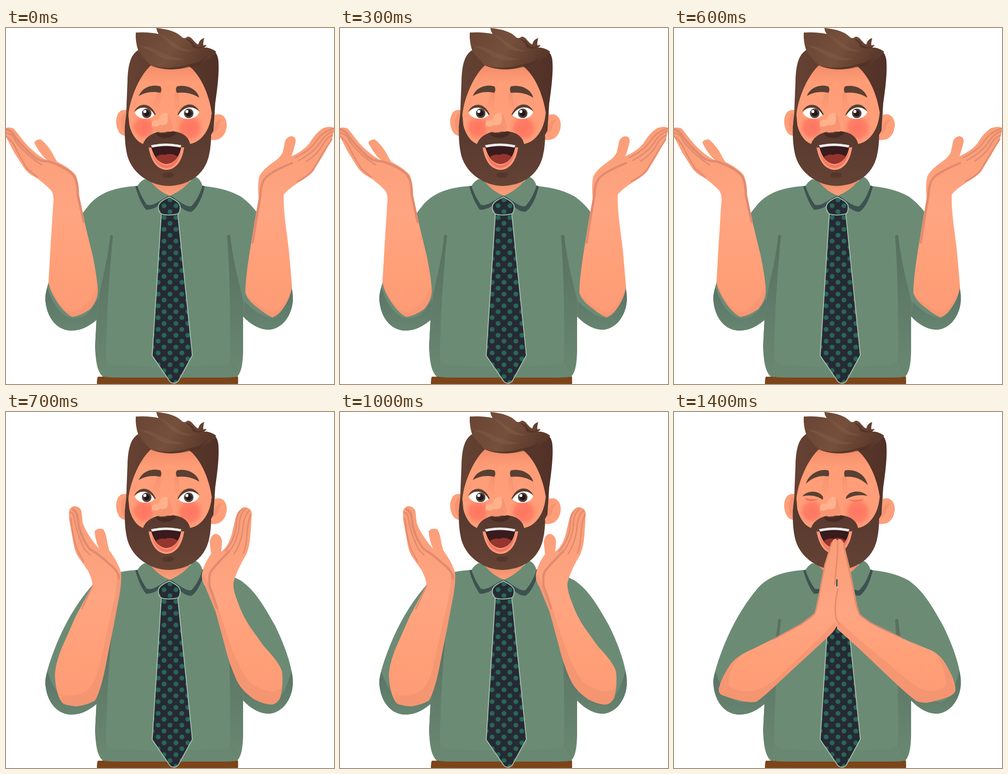
Write an HTML page that moves like this. It is 718 px wide and 780 px high and loops after 1500 ms.

```html
<!DOCTYPE html>
<html lang="en">
<head>
<meta charset="utf-8">
<title>Clapping man</title>
<style>
  html, body { margin: 0; width: 100%; height: 100%; overflow: hidden; background: #fff; }
  svg { display: block; width: 718px; height: 780px; }
  .skin { fill: url(#skin); }
  .shade { fill: #ed8f6f; }
  .line { fill: none; stroke: #e18b6f; stroke-width: 5; stroke-linecap: round; stroke-linejoin: round; }
  .thin { stroke-width: 3; }
  .brow { fill: #5a4033; }
  .dark { fill: #3d5250; }
  .cloth { fill: #6c8b75; }
  .tie { fill: url(#dots); stroke: #a5c0ae; stroke-width: 2; stroke-linejoin: round; }
</style>
</head>
<body>
<svg viewBox="0 0 718 780">
  <defs>
    <linearGradient id="skin" x1="0" y1="0" x2="0" y2="1">
      <stop offset="0" stop-color="#fa9d78"/><stop offset=".45" stop-color="#ffa581"/><stop offset=".75" stop-color="#ff9f78"/><stop offset="1" stop-color="#fc9b75"/>
    </linearGradient>
    <linearGradient id="face" x1="0" y1="0" x2="0" y2="1">
      <stop offset="0" stop-color="#f18c68"/><stop offset=".2" stop-color="#ff9d77"/><stop offset="1" stop-color="#ff9f7a"/>
    </linearGradient>
    <linearGradient id="neck" x1="0" y1="0" x2="0" y2="1">
      <stop offset="0" stop-color="#e38461"/><stop offset="1" stop-color="#ffa27d"/>
    </linearGradient>
    <linearGradient id="hair" x1="0" y1="0" x2="1" y2="0">
      <stop offset="0" stop-color="#654233"/><stop offset=".6" stop-color="#5b392c"/><stop offset="1" stop-color="#513127"/>
    </linearGradient>
    <linearGradient id="quiff" x1="0" y1="0" x2="1" y2=".3">
      <stop offset="0" stop-color="#684434"/><stop offset=".55" stop-color="#76503c"/><stop offset="1" stop-color="#5b392b"/>
    </linearGradient>
    <linearGradient id="beard" x1="0" y1="0" x2="0" y2="1">
      <stop offset="0" stop-color="#53352c"/><stop offset=".6" stop-color="#5e3e32"/><stop offset="1" stop-color="#644234"/>
    </linearGradient>
    <linearGradient id="fold" x1="0" y1="0" x2="0" y2="1">
      <stop offset="0" stop-color="#58705f"/><stop offset=".6" stop-color="#627e6b"/><stop offset="1" stop-color="#6a8872"/>
    </linearGradient>
    <linearGradient id="cuff" x1="0" y1="0" x2="0" y2="1">
      <stop offset="0" stop-color="#587264"/><stop offset="1" stop-color="#678570"/>
    </linearGradient>
    <linearGradient id="bridge" x1="0" y1="0" x2="0" y2="1">
      <stop offset="0" stop-color="#ee8a69" stop-opacity=".6"/><stop offset="1" stop-color="#ee8a69" stop-opacity="0"/>
    </linearGradient>
    <radialGradient id="blush">
      <stop offset="0" stop-color="#ff7460"/><stop offset=".55" stop-color="#ff7a63" stop-opacity=".85"/><stop offset="1" stop-color="#ff9d77" stop-opacity="0"/>
    </radialGradient>
    <pattern id="dots" x="346" y="492.6" width="26" height="25.8" patternUnits="userSpaceOnUse">
      <rect width="26" height="26" fill="#252a35"/>
      <g fill="#2a6657">
        <circle cx="13" cy="12.9" r="5.3"/>
        <circle r="5.3"/><circle cx="26" r="5.3"/><circle cy="25.8" r="5.3"/><circle cx="26" cy="25.8" r="5.3"/>
      </g>
    </pattern>
    <clipPath id="faceClip"><path d="M317 82Q355 98 399 82C428 104 446 150 451 190L446 240 403 255Q355 215 300 255L272 235 268 190C272 150 294 103 317 82Z"/></clipPath>
  </defs>

  <g id="body">
    <path fill="#7c4419" d="M201 764H508V780H199Q199 768 201 764Z"/>
    <path class="cloth" d="M286 346C245 349 205 358 180 390C145 432 116 488 97 545C90 567 86 580 86 593C88 637 114 663 143 663C165 663 182 653 198 640L195 696C196 728 199 752 212 764Q230 766 260 766H460Q490 766 506 764C518 752 519 725 519 696V632C536 650 556 661 575 661C605 660 628 628 628 592C627 560 612 515 589 468C562 420 545 392 515 370C490 355 460 349 430 346Z"/>
    <path fill="url(#cuff)" d="M91 569C100 600 120 632 145 636C170 637 185 625 202 592L198 640C182 653 165 663 143 663C114 663 88 637 86 593Q86 582 91 569ZM625 567C617 595 605 632 583 636Q550 630 523 600L519 632C536 650 556 661 575 661C605 660 628 628 628 592Q628 580 625 567Z"/>
    <path fill="url(#fold)" d="M228 455Q231 452 234 455C227 530 219 640 219 732L211 763Q199 750 195 700L198 640 204 585C213 540 224 500 228 455ZM484 455Q487 452 491 455C495 500 510 560 521 604L519 632V696Q519 745 506 764L491 732C491 620 490 540 484 455Z"/>
    <path fill="#64806c" d="M219 724Q222 738 245 739Q350 744 465 739Q488 737 491 724L510 755Q505 766 490 766H230L212 764Z" opacity=".35"/>
    <path fill="url(#neck)" d="M314 325H406L398 348 359 369 320 348Z"/>
    <path class="dark" d="M283 347L290 345 318 382 358 367 400 385 428 344 435 347C429 375 417 397 405 403Q393 402 383 393L359 374 326 394Q314 399 306 398C296 385 288 365 283 347Z"/>
    <path class="cloth" d="M303 331Q290 339 288 347C294 365 302 378 308 387Q316 390 328 384L357 367Q331 356 316 335ZM413 325Q426 330 430 346C423 368 414 382 405 391Q395 391 382 382L360 367Q385 356 401 338Z"/>
    <path class="tie" d="M340 407L320 718 359 775Q368 782 377 774L408 717 376 407Z"/>
    <path class="tie" d="M334 388C338 379 347 376 358 370C368 377 378 380 381 389Q382 402 377 407Q358 412 341 408Q331 401 334 388Z"/>
  </g>

  <g id="head">
    <path fill="#ff9f7a" d="M266 181C250 175 241 188 241 207C243 227 252 238 264 236ZM455 191C475 183 485 199 483 217C480 236 469 248 448 245Z"/>
    <path fill="#f08f70" d="M262 184Q249 194 252 214Q254 226 262 233ZM454 225C455 207 464 198 475 201Q465 208 465 219Q461 229 453 232Z" opacity=".65"/>
    <path fill="url(#hair)" d="M290 48C273 58 267 80 266 115L263 190 260 220 300 250H440L454 225 458 165C463 130 467 97 465 72Q463 48 440 43Z"/>
    <path fill="url(#face)" d="M317 82Q355 98 399 82C428 104 446 150 451 190L446 250 403 265H300L272 235 268 190C272 150 294 103 317 82Z"/>
    <g clip-path="url(#faceClip)">
      <path fill="url(#bridge)" d="M341 133Q338 155 337 185H318Q325 160 331 138ZM370 140Q366 160 370 185H385Q378 160 378 140Z"/>
      <circle cx="302" cy="218" r="32" fill="url(#blush)"/>
      <circle cx="402" cy="219" r="35" fill="url(#blush)"/>
    </g>
    <path fill="url(#beard)" d="M264 188C258 215 259 255 266 281C277 319 316 346 357 346C402 344 434 321 444 281Q449 260 449 235L457 185 450 188C447 224 427 250 403 254Q398 232 371 227H335Q307 234 300 254C281 247 268 221 266 188Z"/>
    <path fill="#f79572" d="M326 204Q317 207 318 217Q323 226 338 229Q355 230 366 219L357 190Z"/>
    <path fill="#ffb08c" d="M337 193Q345 183 353 187Q357 201 352 210Q344 215 337 212Q329 219 320 214Q316 205 326 201Q336 203 337 193Z"/>
    <path fill="#492b23" d="M328 229Q347 236 365 226Q374 227 371 233Q350 248 330 235Z"/>
    <path fill="url(#quiff)" d="M284 10Q310 8 334 13Q330 7 329 0C350 2 374 7 386 21Q393 24 397 19Q404 18 411 28Q418 36 421 36Q423 25 434 22Q431 33 432 38L439 37Q436 43 432 43Q450 43 460 52Q442 78 399 83Q358 99 317 82Q301 65 290 51Q283 32 284 10Z"/>
    <path fill="#86604a" d="M292 40C325 36 350 68 394 67Q360 76 334 62Q313 46 292 40ZM334 13C360 21 376 48 410 50Q380 55 362 39Q348 23 334 13Z" opacity=".4"/>
    <path fill="#4d3026" d="M317 82Q358 93 398 80Q425 76 436 65Q427 84 399 86Q358 97 317 82ZM394 25Q406 23 413 38Q425 45 436 40Q425 49 408 42Q407 32 394 25Z" opacity=".7"/>

    <g id="awake">
      <path class="brow" d="M291 149C297 131 319 122 338 128Q342 134 338 142C320 138 304 141 291 149ZM374 128Q370 135 374 142C394 140 410 144 423 153C419 134 395 123 374 128Z"/>
      <path fill="#fff" d="M282 186C292 169 315 169 326 189C317 203 290 202 282 186ZM377 190C386 169 412 168 423 184C417 202 387 204 377 190Z"/>
      <g fill="#55423d"><circle cx="308" cy="187" r="10.5"/><circle cx="400" cy="187" r="10.5"/></g>
      <g fill="#231819"><circle cx="308" cy="187" r="6.8"/><circle cx="400" cy="187" r="6.8"/></g>
      <g fill="#fff"><circle cx="304" cy="183" r="3.3"/><circle cx="396" cy="183" r="3.3"/></g>
      <path class="brow" d="M280 184C291 161 317 163 328 190L325 190C314 171 294 170 280 184ZM375 191C386 162 413 160 424 184C410 169 390 171 378 190Z"/>
    </g>
    <g id="laugh">
      <path class="brow" d="M289 157C294 137 318 123 338 128Q341 134 338 141C319 138 302 144 289 157ZM374 128Q371 135 374 142C394 140 410 146 424 160C419 137 397 124 374 128Z"/>
      <path class="brow" d="M281 185C292 170 319 172 326 186Q327 191 325 192C313 183 295 181 281 185ZM376 190C378 174 407 167 424 184C408 180 391 183 378 190Z"/>
      <path fill="#f5745d" d="M286 188Q300 192 317 190Q309 196 296 195Q288 194 286 188ZM384 192Q400 194 416 190Q412 196 398 197Q387 197 384 192Z"/>
    </g>

    <path fill="#ff9a7b" d="M312 261Q318 265 320 256H382Q383 264 390 261C386 289 374 310 351 311C328 309 317 289 312 261Z"/>
    <path fill="#f27660" d="M318 270Q330 298 351 301Q373 296 384 269Q376 305 351 307Q326 305 318 270Z"/>
    <path fill="#391b1d" d="M317 257Q350 248 384 257C382 277 371 297 350 298C331 295 322 278 317 257Z"/>
    <path fill="#f0eded" d="M317 257Q350 249 384 257L382 262Q350 255 320 262Z"/>
    <path fill="#96352d" d="M327 284Q336 275 349 278Q361 272 376 282Q367 297 350 298Q337 296 327 284Z"/>
    <path fill="#4d3026" d="M343 319Q354 315 367 318Q368 325 362 328H347Q341 326 343 319Z" opacity=".6"/>
  </g>

  <g id="wide">
    <path class="skin" d="M-6 222Q3 215 16 220C26 230 40 252 55 265Q74 283 90 290L83 283Q71 270 62 251Q65 244 76 244Q94 258 106 283L112 293Q143 309 153 323Q160 340 160 365L173 430 190 500Q200 550 201 577Q200 598 184 616Q163 631 145 633Q130 626 114 603Q95 575 93 556L98 470 104 376Q104 362 98 355Q79 336 64 327Q46 318 37 303L18 273 0 238Z"/>
    <path class="shade" d="M201 577Q200 598 184 616Q163 631 145 633Q130 626 114 603Q95 575 93 556Q108 594 130 617Q149 630 171 609Q191 590 201 562Z" opacity=".4"/>
    <path class="line" d="M0 222Q14 226 20 239Q38 262 62 283Q76 293 92 292Q130 304 147 322Q157 335 157 366L170 425"/>
    <path class="line thin" d="M2 230Q17 234 20 247Q43 278 78 300M1 238Q15 248 23 267Q38 296 47 309L68 326"/>
    <path class="skin" d="M695 219Q711 214 718 219Q718 232 712 246L694 279 672 315Q663 325 641 338Q616 354 608 365Q607 390 612 430L619 485 626 565Q624 590 606 615Q596 629 583 634Q569 628 551 613Q529 597 524 580Q524 553 532 500L544 425 553 374Q550 340 555 324Q563 309 588 292Q601 283 606 272L611 248Q615 238 625 237Q635 238 634 249Q631 263 625 281Q650 270 664 253Q678 229 695 219Z"/>
    <path class="shade" d="M524 580Q528 598 551 613Q569 628 583 634Q596 629 606 615Q624 590 626 565Q612 611 584 624Q543 606 524 580Z" opacity=".4"/>
    <path class="line" d="M626 296Q575 317 566 331Q558 341 557 366L549 413 540 470"/>
    <path class="line thin" d="M717 220Q690 230 680 247Q666 268 633 284M716 226Q697 234 687 252Q673 273 641 290M714 235Q699 242 693 257Q681 277 658 292M713 244L691 278 671 312Q660 325 638 336"/>
  </g>

  <g id="near">
    <path class="skin" d="M138 216Q143 206 151 206Q162 208 165 217L168 243Q174 262 194 288L204 300Q195 280 194 261Q201 253 213 257Q219 265 222 288L226 303Q247 332 252 353Q253 372 249 397L236 466 220 546Q209 607 195 632Q178 642 155 645Q134 643 125 639Q109 622 107 576Q108 552 122 517L153 447 188 382Q192 373 179 347L157 316Q149 301 147 284L138 234Z"/>
    <path class="shade" d="M252 353Q253 372 249 397L236 466 220 546Q209 607 195 632Q178 642 155 645Q134 643 123 637Q119 618 133 621Q171 624 187 600Q201 578 208 540L237 410Q244 377 242 353Z" opacity=".5"/>
    <path class="line" d="M146 213Q155 217 157 233Q160 270 183 300Q205 313 226 333Q246 348 247 364"/>
    <path class="line thin" d="M140 220Q148 219 150 235Q155 267 172 301L184 313M142 233Q147 282 158 306L170 328M190 380L166 431"/>
    <path class="skin" d="M503 230Q508 216 514 214Q518 207 525 209Q537 211 538 222L535 270Q533 298 525 314Q505 347 498 374Q496 389 508 418Q518 447 535 472L565 514Q598 548 604 568Q608 597 600 627Q593 639 583 641Q568 642 544 630Q516 611 505 588Q488 551 478 508L459 438 437 384Q427 368 429 355Q432 335 449 311L446 286Q448 268 460 267Q472 270 473 285L471 306Q488 294 495 264Z"/>
    <path class="shade" d="M429 360Q434 350 442 375L452 389 480 477Q501 543 522 577Q535 600 569 610Q596 617 604 601L600 627Q593 639 583 641Q568 642 544 630Q516 611 505 588Q488 551 478 508L459 438 437 384Z" opacity=".5"/>
    <path class="line" d="M489 305Q457 337 448 350Q443 362 446 383L462 430"/>
    <path class="line thin" d="M516 213Q504 224 504 248Q502 278 480 305M525 211Q511 224 511 246Q509 276 491 303M533 216Q521 227 519 250Q516 287 499 311M536 225Q529 240 528 267Q526 293 520 309"/>
  </g>

  <g id="clasp">
    <path class="skin" d="M359 279Q367 276 372 288L384 338 396 397Q400 426 408 444Q421 460 457 477L516 503 565 523Q587 535 600 562Q617 591 616 611Q613 619 601 624Q574 634 553 637Q539 637 530 633Q503 612 470 580L407 520 357 475 352 430 354 330Z"/>
    <path class="shade" d="M357 473Q360 457 367 464L400 494 463 546Q506 584 537 605Q566 620 594 601Q598 571 576 535Q593 546 602 566Q617 591 616 611Q613 619 601 624Q574 634 553 637Q539 637 530 633Q503 612 470 580L407 520Z" opacity=".5"/>
    <path class="line thin" d="M371 289L393 391Q398 428 407 445L430 462 496 494"/>
    <path class="skin" d="M345 287Q348 278 354 278Q360 282 359 294L356 347 354 389Q359 410 357 464Q356 475 341 489L299 528 234 588Q199 622 180 635Q157 639 107 621Q97 618 98 606Q105 579 125 551Q140 533 173 519L234 489 282 462Q302 453 308 441L318 393 329 335Z"/>
    <path class="shade" d="M98 606Q105 579 125 551Q137 537 153 529Q119 554 120 600Q143 617 177 610Q207 603 241 569L318 495 355 459Q358 473 341 489L299 528 234 588Q199 622 180 635Q157 639 107 621Q97 618 98 606Z" opacity=".5"/>
    <path class="line thin" d="M345 287L330 337 319 394Q314 426 308 442L280 464 218 498M358 282Q359 312 355 342L352 378M359 388Q353 408 353 435Q353 456 363 465"/>
    <path class="dark" d="M355 368Q357 364 358 368V381L355 383Z"/>
  </g>
</svg>
<script>
const STEPS = 15, STEP_MS = 100;

// Shows a group only during the steps that pass the test.
function show(id, test) {
  const frames = Array.from({ length: STEPS + 1 }, (_, i) => ({
    offset: i / STEPS,
    visibility: test(i % STEPS) ? 'visible' : 'hidden',
    easing: 'step-end'
  }));
  document.getElementById(id).animate(frames, { duration: STEPS * STEP_MS, iterations: Infinity });
}

['wide', 'near', 'clasp'].forEach((id, pose) => show(id, i => i % 3 === pose));
show('awake', i => i < STEPS - 1);
show('laugh', i => i === STEPS - 1);
</script>
</body>
</html>
```
